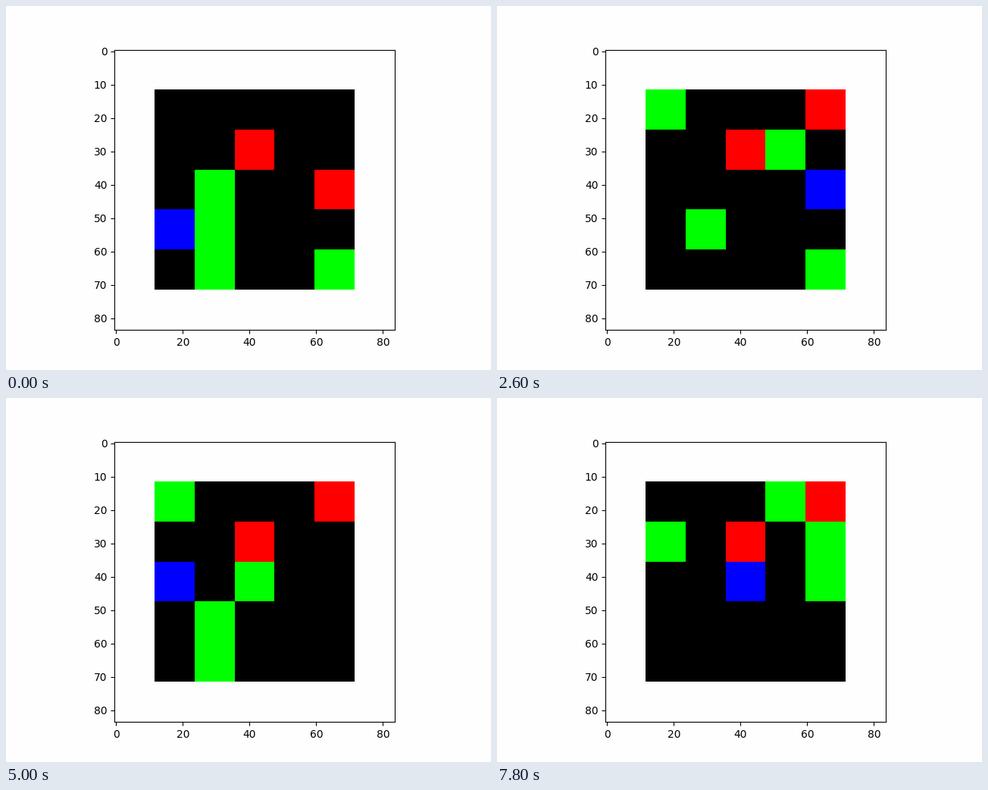
These frames come from a looping animation (640 by 480 pixels, 8000 ms). A matplotlib script:

```python
import numpy as np
import matplotlib.pyplot as plt
from matplotlib.animation import FuncAnimation

SIZE, CELL, PAPER = 5, 12, 254
RED, GREEN, BLUE = (255, 0, 0), (0, 255, 0), (0, 0, 255)
START = (3, 0)

# Each item sits on the first (row, column) of its trail and hops on when eaten.
TRAILS = {
    "a": [(2, 1), (4, 2), (1, 4), (1, 3), (3, 3), (2, 0), (3, 1), (1, 0)],
    "b": [(3, 1), (1, 3), (3, 1), (4, 1), (4, 4), (0, 3)],
    "c": [(4, 1), (0, 0), (3, 3), (2, 4)],
    "d": [(4, 4), (2, 4), (2, 2), (1, 4)],
    "R": [(2, 4), (0, 4)],
    "S": [(1, 2)],
}
CHASE = "bcaabaddaabacabbcd"


def render(agent, trails):
    grid = np.full((SIZE + 2, SIZE + 2, 3), PAPER, np.uint8)
    board = grid[1:-1, 1:-1]
    board[:] = 0
    for name, trail in trails.items():
        board[trail[0]] = GREEN if name.islower() else RED
    board[agent] = BLUE
    return grid.repeat(CELL, axis=0).repeat(CELL, axis=1)


def step(pos, goal):
    """One cell towards the goal, sideways first."""
    (row, col), (goal_row, goal_col) = pos, goal
    if col != goal_col:
        return row, col + (1 if goal_col > col else -1)
    return row + (1 if goal_row > row else -1), col


def play():
    agent = START
    trails = {name: list(cells) for name, cells in TRAILS.items()}
    yield render(agent, trails)
    for name in CHASE:
        goal = trails[name][0]
        while agent != goal:
            agent = step(agent, goal)
            for trail in trails.values():
                if trail[0] == agent:
                    trail.pop(0)
            yield render(agent, trails)


images = list(play())
paper = (PAPER / 255,) * 3
fig, ax = plt.subplots(figsize=(6.4, 4.8), dpi=100, facecolor=paper)
view = ax.imshow(images[0])


def update(i):
    view.set_data(images[i])
    return [view]


anim = FuncAnimation(fig, update, frames=len(images), interval=200,
                     repeat=True, repeat_delay=0)
plt.show()
```
